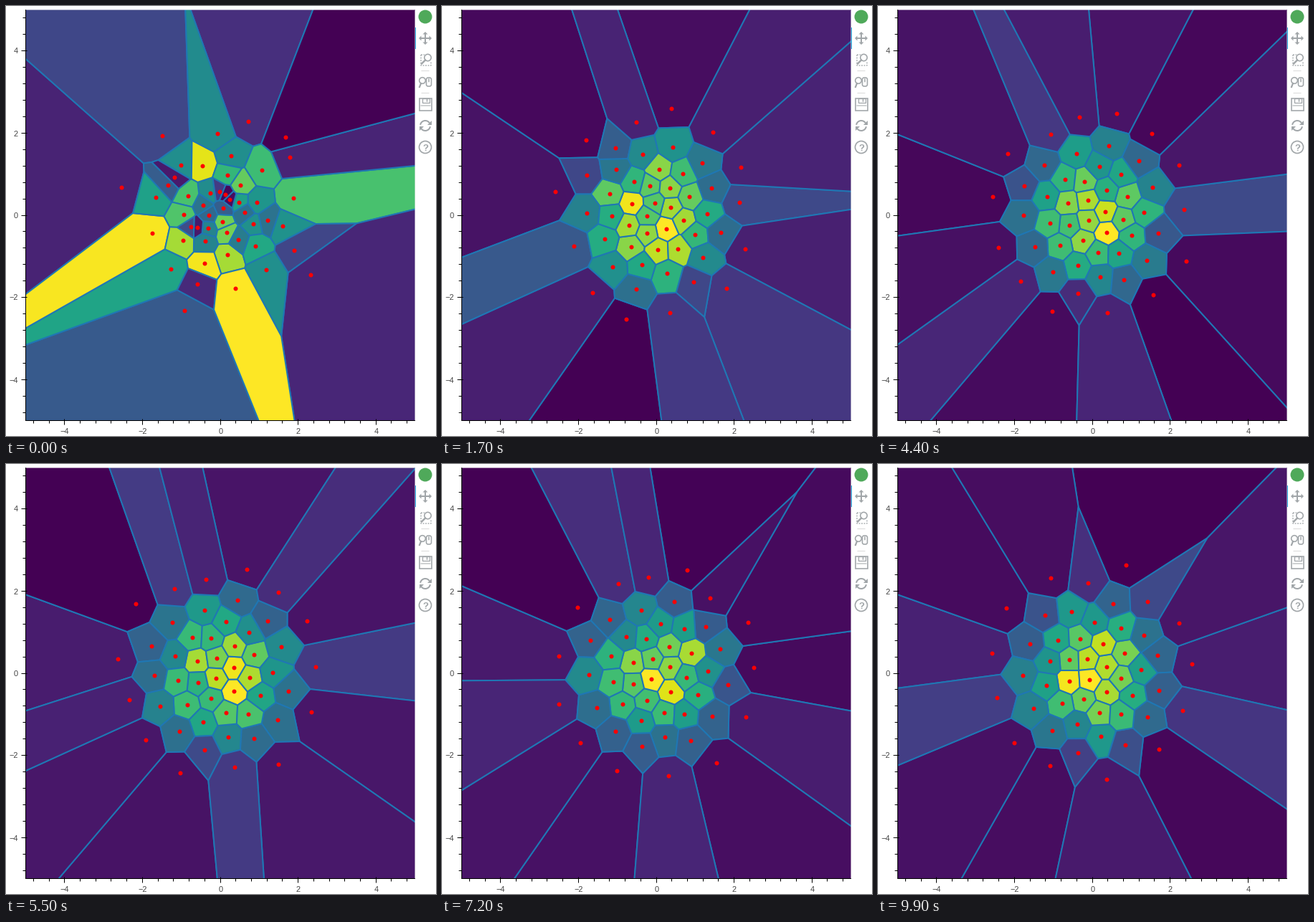
A matplotlib script that plays this animation: 600 by 600 pixels, repeating every 10 s.

```python
import numpy as np
import matplotlib.pyplot as plt
from matplotlib.animation import FuncAnimation
from matplotlib.collections import PolyCollection
from matplotlib.patches import Arc, Circle, FancyBboxPatch, Polygon, Rectangle

SITES, SAMPLES, STEPS, DPI = 50, 5000, 100, 100
PX = 72 / DPI                      # one pixel in points
EDGE, ICON = "#1f77b4", "#a1a6a9"
LEFT, TOP, RIGHT, BOTTOM = 27.5, 5.5, 570.5, 578.5
ORIGIN = np.array([LEFT + RIGHT, TOP + BOTTOM]) / 2
SCALE = np.array([RIGHT - LEFT, TOP - BOTTOM]) / 10


def to_px(p):
    return ORIGIN + SCALE * np.asarray(p)


def lloyd(steps, seed=0):
    """Randomized Lloyd iterations for the standard normal law in the plane."""
    rng = np.random.RandomState(seed)
    sites = rng.normal(size=(SITES, 2))
    for _ in range(steps):
        x = rng.normal(size=(SAMPLES, 2))
        near = np.argmin((sites ** 2).sum(1) - 2 * x @ sites.T, axis=1)
        mass = np.bincount(near, minlength=SITES)
        sums = np.stack([np.bincount(near, col, SITES) for col in x.T], axis=1)
        sites = np.where(mass[:, None] > 0,
                         sums / np.maximum(mass, 1)[:, None], sites)
        yield sites, mass


def clip(poly, a, b, c):
    """Part of a convex polygon where a*x + b*y <= c."""
    out = []
    x0, y0 = poly[-1]
    d0 = a * x0 + b * y0 - c
    for x1, y1 in poly:
        d1 = a * x1 + b * y1 - c
        if (d0 > 0) != (d1 > 0):
            t = d0 / (d0 - d1)
            out.append((x0 + t * (x1 - x0), y0 + t * (y1 - y0)))
        if d1 <= 0:
            out.append((x1, y1))
        x0, y0, d0 = x1, y1, d1
    return out


def voronoi(sites, r=6):
    cells = []
    dist = np.hypot(*(sites[:, None] - sites[None]).transpose(2, 0, 1))
    pts = sites.tolist()
    for i, (px, py) in enumerate(pts):
        poly = [(-r, -r), (r, -r), (r, r), (-r, r)]
        for j in np.argsort(dist[i])[1:]:
            reach = max((x - px) ** 2 + (y - py) ** 2 for x, y in poly)
            if dist[i, j] ** 2 > 4 * reach:
                break
            qx, qy = pts[j]
            poly = clip(poly, qx - px, qy - py,
                        (qx * qx + qy * qy - px * px - py * py) / 2)
        cells.append(to_px(poly))
    return cells


fig = plt.figure(figsize=(6, 6), dpi=DPI, facecolor="white")
ax = fig.add_axes([0, 0, 1, 1])
ax.set_xlim(0, 600)
ax.set_ylim(600, 0)
ax.axis("off")


def line(xs, ys, color="black", width=1, **kw):
    ax.plot(xs, ys, color=color, lw=width * PX, snap=False, **kw)


def label(x, y, text, ha, size=11, color="#444444", **kw):
    ax.text(x, y, text, ha=ha, va="baseline", color=color,
            family="Liberation Sans", size=size * PX, **kw)


def shape(patch, width=1.6):
    patch.set(facecolor="none", edgecolor=ICON, linewidth=width * PX)
    ax.add_patch(patch)


def solid(points, color=ICON):
    ax.add_patch(Polygon(points, facecolor=color, edgecolor="none"))


def axes_frame():
    line([LEFT, RIGHT, RIGHT], [TOP, TOP, BOTTOM], "#e5e5e5", alpha=0.5,
         zorder=4)
    line([LEFT, LEFT], [TOP, BOTTOM], zorder=5)
    line([LEFT, RIGHT], [BOTTOM, BOTTOM], zorder=5)
    for k in range(-12, 13):
        major = k % 5 == 0
        x, y = np.floor(to_px((0.4 * k, 0.4 * k))) + 0.5
        out, inside = (6, 2) if major else (4, 0)
        kw = dict(zorder=5, solid_capstyle="butt")
        line([x, x], [BOTTOM - inside, BOTTOM + out], **kw)
        line([LEFT - out, LEFT + inside], [y, y], **kw)
        if major:
            text = str(2 * k // 5).replace("-", "\u2212")
            label(x, 597, text, "center")
            label(16.5, y + 4, text, "right")


def toolbar():
    ax.add_patch(Circle((585, 15), 9.5, color="#4fa95a", lw=0))
    line([571, 571], [31, 59], "#26aae1", 2)
    for y in (90.5, 121.5):
        line([580, 590], [y, y], "#d9d9d9")

    # pan
    line([578, 592], [45, 45], ICON, 2)
    line([585, 585], [38, 52], ICON, 2)
    for ux, uy in ((1, 0), (-1, 0), (0, 1), (0, -1)):
        solid([(585 + 9 * ux, 45 + 9 * uy),
               (585 + 5.5 * ux - 3.5 * uy, 45 + 5.5 * uy + 3.5 * ux),
               (585 + 5.5 * ux + 3.5 * uy, 45 + 5.5 * uy - 3.5 * ux)])

    # box zoom
    line([579, 579, 593, 593], [68, 83, 83, 77], ICON, 1.3, ls=(0, (1.5, 1.2)))
    line([579, 584], [68, 68], ICON, 1.3, ls=(0, (1.5, 1.2)))
    shape(Circle((588.5, 72), 4.7))
    line([585, 580], [75.5, 80.5], ICON, 2.4)

    # wheel zoom
    shape(Circle((581, 104), 4.3))
    line([579, 577], [108, 113], ICON, 2.2)
    shape(FancyBboxPatch((589, 102.5), 2, 7,
                         boxstyle="round,pad=2.5,rounding_size=2.5"))
    line([590, 590], [102, 105.5], ICON, 1.5)

    # save
    shape(Rectangle((577, 128.5), 17, 17))
    shape(Rectangle((581, 128.5), 9.5, 6), 1.3)
    line([587.5, 587.5], [130, 133], ICON, 1.5)
    line([579, 592], [139, 139], ICON, 1)

    # reset
    shape(Arc((585, 167), 14, 14, theta1=190, theta2=330), 2)
    shape(Arc((585, 167), 14, 14, theta1=10, theta2=150), 2)
    solid([(593.5, 160), (593.5, 166), (587.5, 166)])
    solid([(576.5, 174), (576.5, 168), (582.5, 168)])

    # help
    shape(Circle((585, 197), 8.5), 1.7)
    label(585, 201.7, "?", "center", 13, ICON, weight="bold")


axes_frame()
toolbar()

window = Rectangle((LEFT - 0.5, TOP - 0.5), RIGHT - LEFT + 1, BOTTOM - TOP + 1,
                   facecolor="none", edgecolor="none")
ax.add_patch(window)
mesh = PolyCollection([], edgecolors=EDGE, linewidths=2 * PX, zorder=2)
mesh.set_joinstyle("round")
ax.add_collection(mesh, autolim=False)
mesh.set_clip_path(window)
dots, = ax.plot([], [], "o", color="red", ms=6 * PX, mew=0, zorder=3,
                snap=False)

history = list(lloyd(STEPS))


def draw(n):
    # Colours show the cell masses that led to the current sites.
    sites, mass = history[n]
    mesh.set_verts(voronoi(sites))
    mesh.set_facecolor(plt.cm.viridis((mass - mass.min()) / np.ptp(mass)))
    dots.set_data(*to_px(sites).T)
    return mesh, dots


anim = FuncAnimation(fig, draw, frames=STEPS, interval=100,
                     init_func=lambda: draw(0), repeat=True)
plt.show()
```
